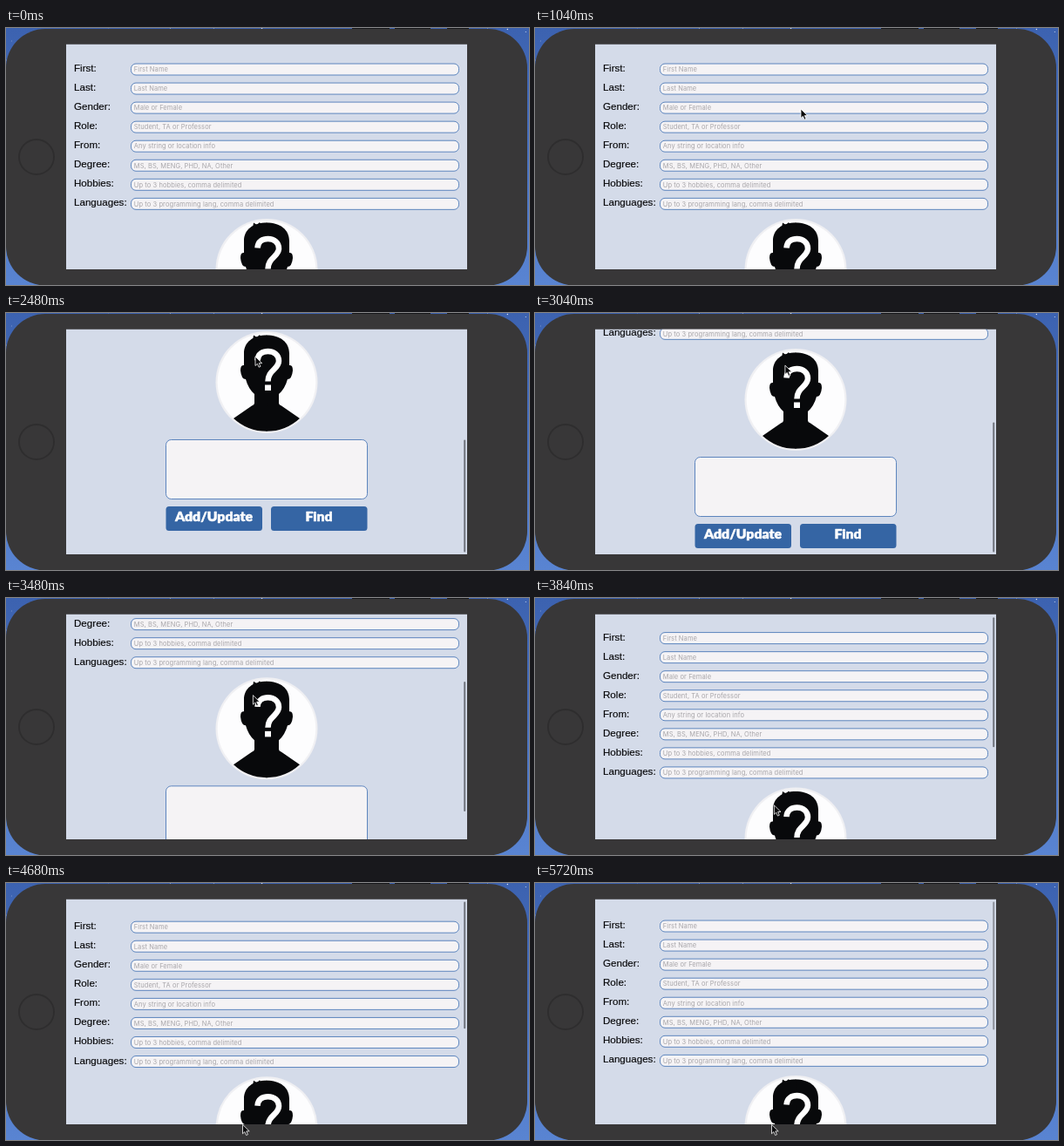
These frames come from a looping animation (600 px wide and 295 px high, 5.76 s). An HTML page:

```html
<!DOCTYPE html>
<html lang="en">
<head>
<meta charset="utf-8">
<title>Profile form</title>
<style>
  html, body { margin: 0; width: 100%; height: 100%; overflow: hidden; background: #4a74c2; }
  svg { display: block; width: 600px; height: 295px; }
  .label { font: 11.6px "Liberation Sans", Arial, sans-serif; fill: #08080a; stroke: #08080a; stroke-width: .15; }
  .hint { font: 7.5px Inter, Roboto, sans-serif; letter-spacing: .08px; fill: #a8a6aa; }
  .field { fill: #f5f3f5; stroke: #4d7ab8; stroke-width: .9; }
  .button { fill: #3565a4; }
  .caption {
    font: 900 15.8px Lato, "Open Sans", sans-serif; text-anchor: middle;
    fill: #fff; stroke: #fff; stroke-width: .5; stroke-linejoin: round;
  }
</style>
</head>
<body>
<svg viewBox="0 0 600 295">
  <defs>
    <linearGradient id="sky" x1="0" y1="0" x2="0" y2="1">
      <stop offset="0" stop-color="#3c62b0"/>
      <stop offset="1" stop-color="#5984d2"/>
    </linearGradient>
    <clipPath id="screen"><rect x="69" y="18.7" width="460" height="258.3"/></clipPath>
  </defs>

  <rect width="600" height="295" fill="url(#sky)"/>
  <g id="stars" fill="#dfe8fa"></g>
  <path d="M397 .5h43M446 .5h41M506 .5h25" stroke="#16171b" stroke-width="2"/>
  <rect y="1" width="598" height="294.5" rx="45" fill="#383738"/>
  <circle cx="35" cy="148" r="20" fill="none" stroke="#2e2d2e" stroke-width="1.8"/>

  <g clip-path="url(#screen)">
    <rect x="69" y="18" width="460" height="260" fill="#d4dbe9"/>
    <g id="page">
      <g id="rows"></g>
      <g transform="translate(299 277.5)">
        <circle r="58.5" fill="#f0f0f3"/>
        <circle r="56.3" fill="#fdfdfe"/>
        <g fill="#08090b">
          <path id="half" d="M-.5-54C16-54 26-46 26-33V-19.5q4-1 4 6-1 10-6 10-3 11-10 17V24
            q0 2 3 3L38 41.5A56.3 56.3 0 0 1-.5 56.3z"/>
          <use href="#half" transform="scale(-1 1)"/>
          <path d="M-16-48l1-6 4 2.500 3-3 3 5z"/>
        </g>
        <path fill="none" stroke="#fff" stroke-width="6.5"
          d="M-10.500-25C-10-33-4-35.500 1.500-35.500 9-35.500 14-31 14-24.500 14-15 1.500-14 1.500-1"/>
        <rect x="-2" y="3" width="7" height="6.5" fill="#fff"/>
      </g>
      <rect class="field" x="183.5" y="343.5" width="231" height="68" rx="6"/>
      <rect class="button" x="183.5" y="420" width="110.5" height="28" rx="3.5"/>
      <rect class="button" x="304" y="420" width="110.5" height="28" rx="3.5"/>
      <text class="caption" x="238.5" y="436.8">Add/Update</text>
      <text class="caption" x="359" y="436.8">Find</text>
    </g>
    <rect id="bar" x="525.2" width="2" rx="1" fill="#70747d"/>
  </g>

  <path id="cursor" d="M0 0v10.5l2.4-2.2 1.7 3.9 1.9-.8-1.7-3.800h3.400z"
    fill="#08080a" stroke="#fff" stroke-width=".8" stroke-linejoin="round"/>
</svg>
<script>
const LOOP = 5760, STEP = 40;
const MAX_SCROLL = 178, FLING = 198, REST = -2;
const DRAG_START = 3190, DRAG_END = 4094, DRAG_LENGTH = 216;
const $ = id => document.getElementById(id);

let seed = 7;
const random = () => (seed = seed * 16807 % 2147483647) / 2147483647;
$("stars").innerHTML = Array.from({ length: 160 }, () =>
  `<circle cx="${random() * 600}" cy="${random() * 60}" r="${.4 + random() * .4}"/>`).join("");

const rows = [
  ["First:", "First Name"],
  ["Last:", "Last Name"],
  ["Gender:", "Male or Female"],
  ["Role:", "Student, TA or Professor"],
  ["From:", "Any string or location info"],
  ["Degree:", "MS, BS, MENG, PHD, NA, Other"],
  ["Hobbies:", "Up to 3 hobbies, comma delimited"],
  ["Languages:", "Up to 3 programming lang, comma delimited"]
];
$("rows").innerHTML = rows.map(([label, hint], i) => `
  <g transform="translate(0 ${(i * 22.05).toFixed(2)})">
    <text class="label" x="78" y="50">${label}</text>
    <rect class="field" x="143.5" y="41" width="376" height="13" rx="5.5"/>
    <text class="hint" x="146.8" y="50.3">${hint}</text>
  </g>`).join("");

const clamp = (v, lo, hi) => Math.min(hi, Math.max(lo, v));
// Sine ease from 0 to 1 between two times.
const ease = (t, from, to) => (1 - Math.cos(Math.PI * clamp((t - from) / (to - from), 0, 1))) / 2;

function scrollAt(t) {
  if (t < DRAG_START) {
    return FLING * ease(t, 1880, 2480) - (FLING - MAX_SCROLL) * ease(t, 2480, 2960);
  }
  const free = MAX_SCROLL - DRAG_LENGTH * ease(t, DRAG_START, DRAG_END);
  const pulled = free < 0 ? free * .36 : free;
  if (t < DRAG_END) return pulled;
  return REST + (pulled - REST) * Math.exp((DRAG_END - t) / 256);
}

// Pointer moves: begin, end, and the point reached.
const entry = { x: 420, y: 298 };
const moves = [
  [40, 900, 305, 93],
  [1240, 1720, 288, 197],
  [1880, 2480, 286, 50],
  [2480, DRAG_START, 287, 61.3],
  [DRAG_START, DRAG_END, 271.5, 61.3 + DRAG_LENGTH]
];
const cursorAt = t => moves.reduce((p, [from, to, x, y]) => {
  const k = ease(t, from, to);
  return { x: p.x + (x - p.x) * k, y: p.y + (y - p.y) * k };
}, entry);

function draw(t) {
  const scroll = scrollAt(t);
  const { x, y } = cursorAt(t);
  const inside = clamp(scroll, 0, MAX_SCROLL);
  const over = scroll - inside;

  $("page").setAttribute("transform", `translate(0 ${-scroll})`);
  $("cursor").setAttribute("transform", `translate(${x} ${y})`);
  // The thumb shrinks against whichever end is overscrolled.
  $("bar").setAttribute("y", 21.5 + inside * .584 + Math.max(0, over));
  $("bar").setAttribute("height", 149 - Math.abs(over));
  $("bar").setAttribute("opacity", ease(t, 1880, 1960) - .3 * ease(t, 5640, 5720));
}

const start = performance.now();
function tick(now) {
  const t = Math.max(0, now - start) % LOOP;
  draw(Math.floor(t / STEP) * STEP);
  requestAnimationFrame(tick);
}
draw(0);
requestAnimationFrame(tick);
</script>
</body>
</html>
```
